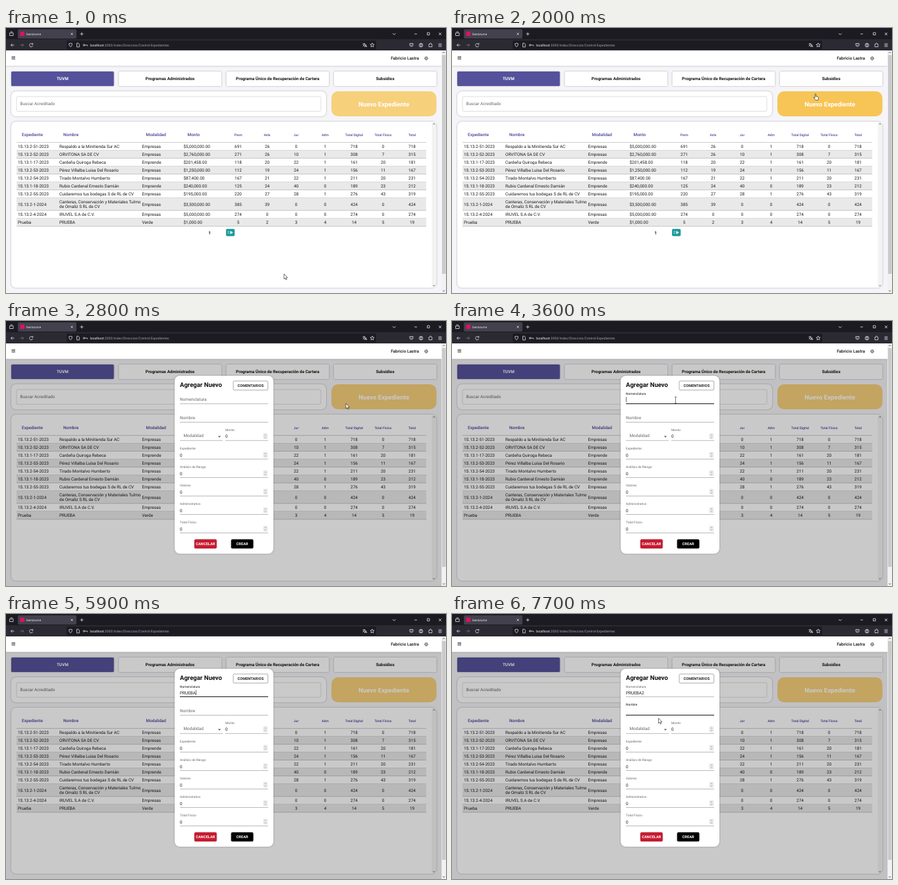
These frames come from a looping animation (668x402 px, 8000 ms). An HTML page:

```html
<!DOCTYPE html>
<html lang="es">
<head>
<meta charset="utf-8">
<title>Control de expedientes</title>
<style>
  html, body { margin: 0; width: 100%; height: 100%; overflow: hidden; background: #f5f5f9; }
  svg { display: block; width: 100%; height: 100%; }
  text { font-family: Roboto, sans-serif; text-rendering: geometricPrecision; white-space: pre; }
  .card { filter: drop-shadow(0 .5px 1px #0005); }
  .icon { fill: none; stroke: #e4e4ea; stroke-width: .8; }
</style>
</head>
<body>
<svg id="stage" viewBox="0 0 668 402"></svg>
<script>
const rect = (x, y, w, h, fill, r = 0, extra = '') =>
  `<rect x="${x}" y="${y}" width="${w}" height="${h}" fill="${fill}" rx="${r}" ${extra}/>`;
const text = (x, y, content, { size = 6.45, fill = '#1c1c1c', weight = 400, anchor = 'start', extra = '' } = {}) =>
  `<text x="${x}" y="${y}" font-size="${size}" fill="${fill}" font-weight="${weight}" text-anchor="${anchor}" ${extra}>${content}</text>`;
const center = (x, y, content, style) => text(x, y, content, { anchor: 'middle', ...style });
const path = (d, extra = 'class="icon"') => `<path d="${d}" ${extra}/>`;
const circle = (x, y, r, extra = 'class="icon"') => `<circle cx="${x}" cy="${y}" r="${r}" ${extra}/>`;
const line = (x1, x2, y, color = '#8c8c8c', width = .6) =>
  path(`M${x1} ${y}H${x2}`, `stroke="${color}" stroke-width="${width}"`);

function browserBar() {
  return rect(0, 0, 668, 17.5, '#1c1b22') + rect(0, 17, 668, 17, '#2b2a33') +
    rect(18, 2, 89, 14, '#42414d', 2) + rect(21.5, 5.5, 6.5, 6.5, '#e0125f') +
    text(30.5, 10.6, 'Gestorume', { size: 4.6, fill: '#f4f4f8' }) +
    path('M98.5 7.5l3 3m0-3l-3 3M112.5 9h5m-2.5-2.5v5') +
    path('M5.5 7.5h5.5v4h-5.5zM6.5 5.8h3.5') +
    path('M587 8l2.3 2.3L591.600 8M620 9h4M639.500 7h3.500v3.500h-3.500zM657 7l4 4m0-4l-4 4') +
    path('M12.500 26h-5m2.200-2.200L7.500 26l2.200 2.200') +
    path('M21.500 26h5m-2.200-2.200l2.200 2.200-2.200 2.200', 'class="icon" opacity=".4"') +
    path('M40.300 24.500a2.600 2.600 0 1 0 .4 2.300M40.800 22.800v2h-2') +
    rect(92, 19, 470, 13.5, '#1c1b22', 2) +
    path('M98 23l2.400.8q0 3.600-2.400 5-2.400-1.400-2.400-5zM107.500 23h2.300l1.500 1.500v4.300h-3.800z') +
    circle(118.5, 26, 1.2) + path('M119.700 26h4v1.500') +
    text(127.5, 27.9, '<tspan fill="#fbfbfe">localhost</tspan>:3000/Index/Direccion/Control-Expedientes',
      { size: 5.15, fill: '#a3a3ab' }) +
    path('M541.500 24h4m-2-1v1m1.300 0q-.6 2.400-3 3.400m.4-2q1 1.700 2.300 2M544.600 29l1.600-4 1.600 4m-2.600-1.300h2') +
    path('M556 22.800l.9 2 2.200.2-1.700 1.500.5 2.200-1.900-1.200-1.900 1.200.5-2.200-1.700-1.500 2.200-.2z') +
    path('M613 23.500h5v2a2.500 2.500 0 0 1-5 0zm1.300 1.700l1.200 1.100 1.200-1.100') +
    circle(630, 26, 2.8) + circle(630, 25, .9) + path('M628.500 28q1.500-1.800 3 0') +
    path('M642 24.500h1.500q0-1.800 1-1.800t1 1.800h1.300v4H642z') +
    path('M656.500 24h5m-5 2h5m-5 2h5');
}

function pageHeader() {
  return rect(0, 34, 661.5, 23.5, '#fff', 0, 'class="card"') +
    path('M8.500 43.300h5.500m-5.500 1.350h5.500m-5.500 1.350h5.500m-5.500 1.350h5.500', 'stroke="#444" stroke-width=".75"') +
    text(627, 48.1, 'Fabricio Lastra', { weight: 500, anchor: 'end', fill: '#111' }) +
    circle(638, 46, 2.4, 'fill="none" stroke="#444" stroke-width="1" stroke-dasharray="1.250 .635"') +
    circle(638, 46, 1.9, 'fill="#fff" stroke="#444" stroke-width=".6"') +
    circle(638, 46, .8, 'fill="none" stroke="#444" stroke-width=".5"');
}

const rows = [
  ['1S.13.2-51-2023', 'Respaldo a la Minitienda Sur AC', 'Empresas', '$5,000,000.00', 691, 26, 0, 1, 718, 0, 718],
  ['1S.13.2-52-2023', 'ORVITONA SA DE CV', 'Empresas', '$2,760,000.00', 271, 26, 10, 1, 308, 7, 315],
  ['1S.13.1-17-2023', 'Cardeña Quiroga Rebeca', 'Emprende', '$201,458.00', 118, 20, 22, 1, 161, 20, 181],
  ['1S.13.2-53-2023', 'Pérez Villalba Luisa Del Rosario', 'Empresas', '$1,250,000.00', 112, 19, 24, 1, 156, 11, 167],
  ['1S.13.2-54-2023', 'Tirado Montalvo Humberto', 'Empresas', '$87,400.00', 167, 21, 22, 1, 211, 20, 231],
  ['1S.13.1-18-2023', 'Rubio Cardenal Ernesto Damián', 'Emprende', '$240,000.00', 125, 24, 40, 0, 189, 23, 212],
  ['1S.13.2-55-2023', 'Cuidaremos tus bodegas S de RL de CV', 'Empresas', '$195,000.00', 220, 27, 28, 1, 276, 43, 319],
  ['1S.13.2-1-2024', 'Canteras, Conservación y Materiales Tulmo|de Omaliz S RL de CV', 'Empresas', '$3,500,000.00', 385, 39, 0, 0, 424, 0, 424],
  ['1S.13.2-4-2024', 'IRUVEL S.A de C.V.', 'Empresas', '$5,000,000.00', 274, 0, 0, 0, 274, 0, 274],
  ['Prueba', 'PRUEBA', 'Verde', '$1,000.00', 5, 2, 3, 4, 14, 5, 19],
];
const leftColumns = [18, 81, 206.5, 269.5];
const countColumn = i => 352.5 + 44 * i;

function table() {
  const purple = '#46439a';
  let out = '';
  [['Expediente', 24], ['Nombre', 87], ['Modalidad', 212.5], ['Monto', 275.5]].forEach(([name, x]) =>
    out += text(x, 164, name, { weight: 500, fill: purple }));
  ['Prom', 'Anls', 'Jur', 'Adm', 'Total Digital', 'Total Físico', 'Total'].forEach((name, i) =>
    out += center(countColumn(i), 163.6, name, { size: 5.05, weight: 500, fill: purple }));
  let top = 173.6;
  out += line(16, 638, top, '#999', .5);
  rows.forEach((row, r) => {
    const height = row[1].includes('|') ? 19.2 : 12;
    const base = top + height / 2 + 2.3;
    if (r % 2) out += rect(16, top, 622, height, '#e9e9e9');
    out += line(16, 638, top + height, '#999', .5);
    row.forEach((cell, i) => {
      if (i > 3) return out += center(countColumn(i - 4), base, cell);
      const parts = String(cell).split('|');
      parts.forEach((part, n) =>
        out += text(leftColumns[i], base + 7.6 * (n - (parts.length - 1) / 2), part));
    });
    top += height;
  });
  return out;
}

function page() {
  const tabs = ['TUVM', 'Programas Administrados', 'Programa Único de Recuperación de Cartera', 'Subsidios'];
  return rect(0, 34, 661.5, 368, '#f5f5f9') +
    tabs.map((name, i) => {
      const x = 8 + 163.3 * i;
      return rect(x, 66, 155.7, 22, i ? '#fff' : '#55519b', 1.5, 'class="card"') +
        center(x + 77.8, 79.3, name, { size: 6.35, weight: 700, fill: i ? '#111' : '#fff' });
    }).join('') +
    rect(8, 96, 478, 38, '#fff', 7, 'class="card"') +
    rect(16, 104, 462, 22.3, '#fff', 1.8, 'stroke="#bbb" stroke-width=".5"') +
    text(21.5, 117.3, 'Buscar Acreditado', { fill: '#666' }) +
    rect(494, 96, 159.5, 38, '#f8ba30', 10, 'id="newButton"') +
    center(573.7, 118.6, 'Nuevo Expediente', { size: 9.5, weight: 700, fill: '#fff' }) +
    rect(8, 142, 645.5, 252, '#fff', 7, 'class="card"') +
    rect(646.5, 142.500, 6.500, 251, '#f3f3f3', 3) +
    path('M648.300 146.300l1.500-1.500 1.500 1.500M648.300 390.200l1.500 1.500 1.500-1.500', 'fill="none" stroke="#555" stroke-width=".9"') +
    table() +
    center(309, 312.5, '1', { weight: 700 }) +
    rect(334, 304.7, 13.2, 11, '#1d9a9a', 2) +
    text(336, 312.4, '2', { size: 5.5, fill: '#e8ffff' }) +
    path('M340.500 307.800l4.300 2.500-4.300 2.500z', 'fill="#fff"');
}

function scrollbar() {
  return rect(661.5, 34, 6.5, 368, '#f1f1f1') + rect(662, 41, 5.5, 332, '#cacaca') +
    path('M663 38l1.700-1.700 1.700 1.700M663 398l1.700 1.700 1.700-1.700', 'fill="none" stroke="#555" stroke-width=".9"');
}

const smallLabel = (x, y, name) => text(x, y, name, { size: 4.85, fill: '#666' });
const numberField = (x, y, name) => smallLabel(x, y, name) +
  text(x, y + 10.4, '0') + line(x, 398, y + 14.3) +
  rect(391, y + 3.8, 5.6, 8, '#eee', 1, 'stroke="#ccc" stroke-width=".4"') +
  path(`M392.600 ${y + 6.8}l1.200-1.200 1.200 1.200m-2.400 2.200l1.200 1.200 1.200-1.200`, 'fill="none" stroke="#555" stroke-width=".5"');

const textField = (id, y, name) =>
  text(264, y, name, { extra: `id="${id}Label"` }) + line(264, 398, y + 4.3) +
  `<line id="${id}Line" y1="${y + 4.2}" y2="${y + 4.2}" stroke="#111" stroke-width=".95"/>`;

function modal() {
  const button = (x, y, w, name, fill, color, extra = '') => rect(x, y, w, 13.8, fill, 1.8, extra) +
    center(x + w / 2, y + 8.9, name, { size: 5.6, weight: 700, fill: color, extra: 'letter-spacing=".08"' });
  return rect(0, 57.5, 661.5, 344.5, '#000', 0, 'opacity=".21"') +
    rect(256, 83, 150, 270, '#fff', 8, 'class="card"') +
    text(264, 100.2, 'Agregar Nuevo', { size: 9.5, weight: 700, fill: '#111' }) +
    button(345, 91, 52.7, 'COMENTARIOS', '#fff', '#222', 'stroke="#555" stroke-width=".5"') +
    textField('code', 121.3, 'Nomenclatura') + textField('name', 149.2, 'Nombre') +
    text(264, 121.5, '', { extra: 'id="typed"' }) +
    text(269.5, 175.8, 'Modalidad', { fill: '#666' }) + line(264, 329, 181.3) +
    path('M321.800 174.500h4.400l-2.200 2.200z', 'fill="#555"') +
    numberField(333, 167, 'Monto') +
    ['Expediente', 'Análisis de Riesgo', 'Valores', 'Administrativo', 'Total Físico']
      .map((name, i) => numberField(264, 195.2 + 28 * i, name)).join('') +
    button(286, 331.2, 33.8, 'CANCELAR', '#c8192f', '#fff', 'class="card"') +
    button(341.8, 331.2, 33.6, 'CREAR', '#000', '#fff', 'class="card"') +
    rect(0, 0, .6, 8, '#111', 0, 'id="caret"');
}

const pointers = {
  arrow: path('M0 0V7.800L1.800 6.200 3 9 4.200 8.500 3 5.800H5.500Z', 'fill="#fff" stroke="#111" stroke-width=".6"'),
  hand: path('M-.6 0q.9-1.400 1.500 0V3.500L4 4.200q1 .3.800 1.500L4.200 9H.2L-2.500 5.500q-.2-1 .9-.6l1 .9z', 'fill="#fff" stroke="#111" stroke-width=".6"'),
  beam: path('M-1.800-4.800h1.300q.5 0 .5.500v8.600q0 .5-.5.500h-1.300M1.800-4.800H.5q-.5 0-.5.500M1.800 4.800H.5q-.5 0-.5-.5', 'fill="none" stroke="#222" stroke-width=".6"'),
};

const stage = document.getElementById('stage');
stage.innerHTML = page() + `<g id="modal">${modal()}</g>` + pageHeader() + scrollbar() + browserBar() +
  '<g id="pointer">' + Object.entries(pointers).map(([id, shape]) => `<g id="${id}">${shape}</g>`).join('') + '</g>';
const el = id => document.getElementById(id);
const show = (id, visible) => el(id).setAttribute('visibility', visible ? 'visible' : 'hidden');
const set = (id, attrs) => Object.entries(attrs).forEach(([key, value]) => el(id).setAttribute(key, value));

const DURATION = 8000, STEP = 100;
const OPEN = 2800, CODE_FOCUS = 3400, NAME_FOCUS = 7000;
const keyTimes = [4200, 4300, 4500, 4700, 5600, 5700, 6000];
const caretSpans = [[3500, 4000], [4200, 5000], [5600, 7500]];
const route = [
  [0, 422, 373], [300, 428, 365], [700, 428, 365], [900, 429, 367], [1100, 429, 367], [1200, 430, 368],
  [1300, 430, 368], [1400, 436, 310], [1500, 462, 140], [1600, 475, 65], [1700, 490, 67], [1900, 545, 95],
  [2200, 565, 111], [2700, 565, 111], [2800, 516, 125], [3100, 400, 122], [3400, 339.5, 120],
  [6400, 339.5, 120], [6700, 310.5, 140], [7000, 309, 148], [7400, 309, 148], [7700, 313.5, 158], [8000, 313.5, 158],
];

const ramp = (t, start, length) => Math.min(1, Math.max(0, (t - start) / length));
const easeOut = p => 1 - (1 - p) ** 3;

function pointerAt(t) {
  const i = route.findIndex(([time]) => time > t);
  const [t0, x0, y0] = route[i - 1], [t1, x1, y1] = route[i];
  const p = (t - t0) / (t1 - t0);
  return [x0 + (x1 - x0) * p, y0 + (y1 - y0) * p];
}

function drawField(id, y, lift, focus) {
  set(id + 'Label', {
    y: y - 9.8 * lift,
    'font-size': 6.45 - 1.6 * lift,
    fill: focus > .5 ? '#111' : '#666',
  });
  set(id + 'Line', { x1: 331 - 67 * focus, x2: 331 + 67 * focus, opacity: focus ? 1 : 0 });
}

function render(t) {
  const open = t >= OPEN;
  el('modal').style.display = open ? '' : 'none';
  set('newButton', { opacity: open ? .62 : .62 + .38 * ramp(t, 1900, 200) });

  const codeFocus = easeOut(ramp(t, CODE_FOCUS, 200));
  const nameFocus = easeOut(ramp(t, NAME_FOCUS, 200));
  drawField('code', 121.3, codeFocus, t < NAME_FOCUS ? codeFocus : 1 - nameFocus);
  drawField('name', 149.2, nameFocus, nameFocus);

  el('typed').textContent = 'PRUEBA2'.slice(0, keyTimes.filter(time => t >= time).length);
  const inName = t >= NAME_FOCUS;
  const caretOn = caretSpans.some(([from, to]) => t >= from && t < to);
  el('caret').style.display = caretOn ? '' : 'none';
  if (caretOn) set('caret', {
    x: 264 + (inName ? 0 : el('typed').getComputedTextLength()),
    y: inName ? 143.2 : 115.2,
  });

  const [x, y] = pointerAt(t);
  const onField = open && x < 398 && (y > 114 && y < 126 || y > 143 && y < 154);
  const onButton = !open && x > 494 && y > 96;
  const shape = onField ? 'beam' : onButton ? 'hand' : 'arrow';
  const pointerOn = t < keyTimes[0] || t >= 6500;
  for (const id in pointers) show(id, pointerOn && id === shape);
  set('pointer', { transform: `translate(${x} ${y})` });
}

function tick(now) {
  render(Math.floor(now % DURATION / STEP) * STEP);
  requestAnimationFrame(tick);
}
render(0);
requestAnimationFrame(tick);
</script>
</body>
</html>
```
